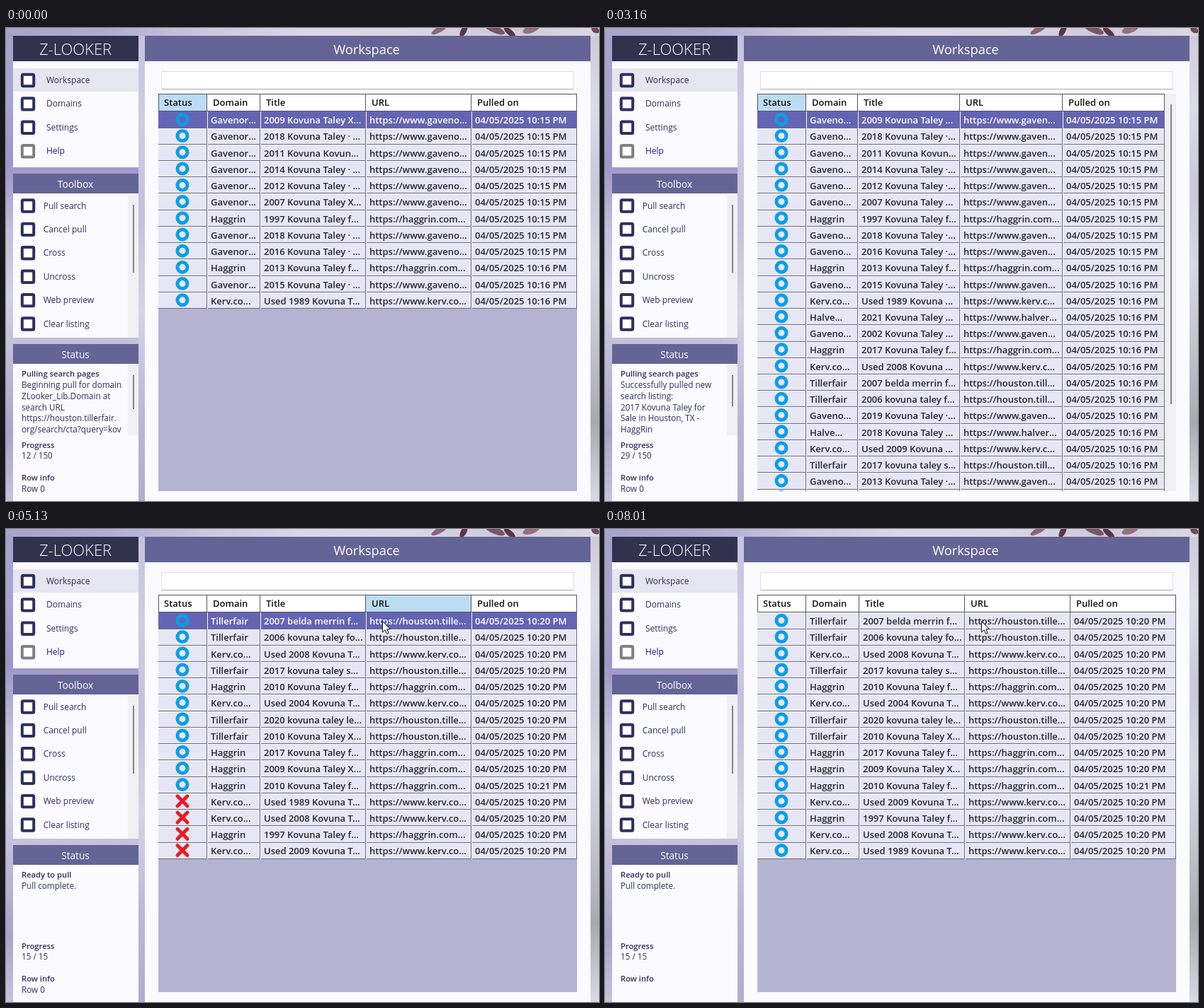
An HTML page with a canvas that plays this animation: 837 by 669 pixels, repeating every 8330 ms.

```html
<!DOCTYPE html>
<html lang="en">
<head>
<meta charset="utf-8">
<title>Listing workspace</title>
<style>
html, body { margin: 0; width: 100%; height: 100%; overflow: hidden; background: #b8b4d4; }
canvas { display: block; }
</style>
</head>
<body>
<canvas id="stage" width="837" height="669"></canvas>
<script>
const ctx = document.getElementById('stage').getContext('2d');
const W = 837, H = 669, LOOP = 8330;
const TOP = 118.3, PITCH = 23.23, BOTTOM = 655;
const NAVY = '#2e2e60', BAR = '#646496', PANEL = '#fafaff', BLUE = '#0a9ee8';
const CELL = '600 13px', BODY = '400 11.7px', BOLD = '600 11.2px';

const SITES = {
  F: { name: 'Gavenork', wide: 7, narrow: 6, url: 'https://www.gavenork.com/marketplace' },
  O: { name: 'Haggrin', wide: 9, narrow: 9, url: 'https://haggrin.com/item/detail' },
  C: { name: 'Kerv.com', wide: 7, narrow: 7, url: 'https://www.kerv.com/vehicledetail' },
  E: { name: 'Halvers', wide: 6, narrow: 5, url: 'https://www.halvers.com/inventory' },
  L: { name: 'Tillerfair', wide: 12, narrow: 12, url: 'https://houston.tillerfair.org/ctd/d' }
};
const CAR = 'Kovuna Taley';
// Kind letter -> [site, title after the year]
const KINDS = {
  F: ['F', CAR + ' · SE Sedan 4D - Gavenork'],
  f: ['F', CAR + ' XLE Sedan 4D - Gavenork'],
  T: ['F', 'Kovuna ' + CAR + ' - Gavenork'],
  O: ['O', CAR + ' for Sale in Houston, TX - HaggRin'],
  o: ['O', CAR + ' XLE for Sale in Houston, TX - HaggRin'],
  C: ['C', CAR + ' for sale near Houston, TX'],
  E: ['E', CAR + ' XLE for sale - Halvers'],
  H: ['L', 'belda merrin for sale by owner - Pearland, TX - tillerfair'],
  L: ['L', 'kovuna taley for sale by owner - Houston, TX - tillerfair'],
  S: ['L', 'kovuna taley sedan - Houston, TX - tillerfair'],
  l: ['L', 'kovuna taley le - Houston, TX - tillerfair'],
  M: ['L', CAR + ' XLE - Houston, TX - tillerfair']
};

function parse(list, stamp) {
  return list.split(' ').map((code, i) => {
    const [site, rest] = KINDS[code[0]], year = code.slice(1);
    return {
      site: SITES[site],
      title: (site === 'C' ? 'Used ' : '') + year + ' ' + rest,
      date: '04/05/2025 10:' + stamp(i) + ' PM'
    };
  });
}
const pulled = parse('f2009 F2018 T2011 F2014 F2012 f2007 O1997 F2018 F2016 O2013 F2015 C1989 ' +
  'E2021 f2002 O2017 C2008 H2007 L2006 F2019 E2018 C2009 S2017 F2013 O2009 ' +
  'O2010 C2004 l2020 M2010 O2017 O2010', i => i < 9 ? 15 : 16);
const sorted = parse('C2008 C2009 O1997 H2007 L2006 C2008 S2017 O2010 C2004 l2020 M2010 ' +
  'O2017 o2009 O2010 C1989', i => i === 13 ? 21 : 20);

// [time, rows in the grid, rows reported]
const PULLS = [
  [0, 12, 12], [240, 13, 12], [320, 14, 13], [400, 15, 14], [440, 16, 15], [520, 17, 16], [600, 17, 17],
  [1200, 18, 17], [1240, 18, 18], [1680, 20, 18], [1720, 21, 20], [1800, 22, 22], [1960, 23, 23],
  [2200, 24, 24], [2400, 25, 24], [2440, 25, 25], [2520, 26, 25], [2560, 26, 26], [2640, 27, 26],
  [2680, 27, 27], [2800, 28, 27], [2840, 28, 28], [3120, 29, 28], [3160, 29, 29], [3400, 30, 29], [3440, 30, 30]
];
// [time, first selected, last selected]
const PICKS = [
  [3700, 0, 0], [3930, 1, 1], [4890, 0, 0], [5610, 1, 1], [5690, 2, 2], [5850, 3, 3],
  [6010, 4, 4], [6090, 5, 5], [6170, 6, 6], [6370, 7, 7], [6530, 8, 8], [6610, 9, 9],
  [6770, 10, 10], [6890, 11, 11], [7170, 11, 12], [7290, 11, 13], [7450, 11, 14], [7850, -1, -1]
];
const CROSSES = [[3730, 0], [4490, 1], [5130, 0]]; // [time, row crossed out]
const UNCROSS = 7850;

const latest = (steps, t) => steps.filter(s => s[0] <= t).pop();

function rect(x, y, w, h, color) {
  ctx.fillStyle = color;
  ctx.fillRect(x, y, w, h);
}
function setFont(font) {
  ctx.font = font + ' "Open Sans", "Noto Sans", sans-serif';
}
function text(str, x, y, font, color, align = 'left') {
  setFont(font);
  ctx.fillStyle = color;
  ctx.textAlign = align;
  ctx.fillText(str, x, y);
}
function clip(str, width) {
  setFont(CELL);
  if (ctx.measureText(str).width <= width) return str;
  let n = str.length;
  while (n && ctx.measureText(str.slice(0, n) + '...').width > width) n--;
  return str.slice(0, n) + '...';
}
function wrap(str, width) {
  setFont(BODY);
  const lines = [''];
  for (const word of str.split(' ')) {
    const last = lines.length - 1, next = lines[last] ? lines[last] + ' ' + word : word;
    if (ctx.measureText(next).width <= width) lines[last] = next;
    else lines.push(word);
  }
  return lines;
}
function strip(x, y, w, h, colors, across) {
  const g = ctx.createLinearGradient(x, y, across ? x + w : x, across ? y : y + h);
  colors.forEach((c, i) => g.addColorStop(i / (colors.length - 1), c));
  rect(x, y, w, h, g);
}
function blob(x, y, rx, ry, turn, color) {
  ctx.fillStyle = color;
  ctx.beginPath();
  ctx.ellipse(x, y, rx, ry, turn, 0, 7);
  ctx.fill();
}

function drawBackdrop() {
  strip(0, 0, 196, H, ['#a6a1cb', '#aaa4d0', '#9d96c8', '#c2bedb', '#d2d0e4', '#bdb8d6', '#aaa3cb', '#c6c2dc']);
  strip(187, 0, 9, H, ['#c6c2de', '#d0cce4', '#c4c0dc', '#d6d4e6', '#bcb8d6', '#b2acd0']);
  strip(825, 0, 12, H, ['#cfc9da', '#dcdce8', '#c9c8dc', '#d8d8e4', '#c4c4d0', '#a9a9b4', '#dadae4']);
  strip(0, 0, W, 11, ['#a8a3cc', '#b0abd2', '#cac7e0', '#d8d6e8', '#d9d7e7', '#cfc9da', '#dcd8e4'], true);
  blob(612, 2, 13, 4, -0.5, '#8c6478');
  blob(646, 4, 4, 9, 0.5, '#5c3448');
  blob(690, 2, 15, 5, 0.4, '#7a5468');
  blob(711, 6, 10, 4, 0.7, '#5c3448');
  blob(741, 2, 12, 5, -0.3, '#94707f');
  blob(832, 3, 6, 4, 0.5, '#74485a');
}

function checkbox(x, y, color) {
  ctx.strokeStyle = color;
  ctx.lineWidth = 4;
  ctx.fillStyle = '#fff';
  ctx.beginPath();
  ctx.roundRect(x - 8.2, y - 8.2, 16.4, 16.4, 1.5);
  ctx.fill();
  ctx.stroke();
}
function thumb(x, y, h) {
  rect(x, y, 2, h, '#868689');
}

function drawSidebar() {
  rect(10, 11, 177, 186, PANEL);
  rect(10, 11, 177, 36, '#32324e');
  text('Z-LOOKER', 98, 38, '300 22px', '#fff', 'center');
  rect(10, 57, 177, 33, '#e6e6f0');
  ['Workspace', 'Domains', 'Settings', 'Help'].forEach((label, i) => {
    const y = 74 + i * 33.4;
    checkbox(31, y, i === 3 ? '#808080' : NAVY);
    text(label, 57, y + 4, '400 12px', i === 3 ? '#1c1c80' : NAVY);
  });

  rect(10, 206, 177, 232, PANEL);
  rect(10, 206, 177, 28, BAR);
  text('Toolbox', 98, 226, '400 13.8px', '#fff', 'center');
  rect(172, 235, 15, 203, '#f0f0f2');
  thumb(179, 250, 96);
  ['Pull search', 'Cancel pull', 'Cross', 'Uncross', 'Web preview', 'Clear listing'].forEach((label, i) => {
    const y = 251.5 + i * 33.4;
    checkbox(31, y, NAVY);
    text(label, 52.7, y + 4, '400 12px', NAVY);
  });

  rect(10, 447, 177, 222, PANEL);
  rect(10, 447, 177, 28, BAR);
  text('Status', 98, 467, '400 13.6px', '#fff', 'center');
}

function drawStatus(s) {
  text(s.heading, 22, 493, BOLD, NAVY);
  s.lines.slice(0, 5).forEach((line, i) => text(line, 22, 509 + i * 15.8, BODY, NAVY));
  if (s.scroll) {
    rect(172, 476, 15, 100, '#f0f0f2');
    thumb(179, 491, s.scroll);
  }
  text('Progress', 22, 594, BOLD, NAVY);
  text(s.progress, 22, 609, BODY, NAVY);
  text('Row info', 22, 640, BOLD, NAVY);
  text(s.rowInfo, 22, 656, BODY, NAVY);
}

function drawMark(y, crossed) {
  ctx.lineWidth = 5;
  ctx.beginPath();
  if (crossed) {
    ctx.strokeStyle = '#e91c24';
    ctx.lineCap = 'round';
    for (const d of [-7, 7]) {
      ctx.moveTo(249 - d, y - 7);
      ctx.lineTo(249 + d, y + 7);
    }
  } else {
    ctx.strokeStyle = BLUE;
    ctx.arc(249, y, 7, 0, 7);
  }
  ctx.stroke();
  ctx.lineCap = 'butt';
}

function drawRow(row, i, cols, narrow, selected) {
  const y = Math.round(TOP + i * PITCH), end = Math.round(TOP + (i + 1) * PITCH);
  const base = TOP + i * PITCH + 16.9, color = selected ? '#fff' : '#26262e';
  rect(215, y, cols[5] - 215, end - y, selected ? '#6464b4' : '#e6e6f5');
  if (!selected) rect(215, y, cols[5] - 215, 1, '#f6f6fc');
  rect(215, end - 1, cols[5] - 215, 1, '#6c6c78');
  for (let c = 1; c < 6; c++) {
    rect(cols[c] - 1, y, 1, end - y, '#6c6c78');
    if (c < 5) rect(cols[c], y, 1, end - y, '#f6f6fc');
  }
  drawMark(TOP + i * PITCH + 11, row.crossed);
  const name = row.site.name, keep = narrow ? row.site.narrow : row.site.wide;
  const cells = [
    name.length > keep ? name.slice(0, keep) + '...' : name,
    clip(row.title, cols[3] - cols[2] - 9),
    clip(row.site.url, cols[4] - cols[3] - 9),
    row.date
  ];
  cells.forEach((cell, c) => text(cell, cols[c + 1] + 5, base, CELL, color));
}

function drawGrid(rows, first, last, hot) {
  const narrow = rows.length > 23;
  const cols = narrow ? [215, 284, 357, 501, 646, 790] : [215, 284, 359, 508, 657, 806];
  rect(215, 93, 591, BOTTOM - 93, '#b4b4d2');
  ctx.save();
  ctx.beginPath();
  ctx.rect(215, 93, 591, BOTTOM - 93);
  ctx.clip();
  rows.slice(0, 24).forEach((row, i) => drawRow(row, i, cols, narrow, i >= first && i <= last));
  ctx.restore();
  ['Status', 'Domain', 'Title', 'URL', 'Pulled on'].forEach((label, c) => {
    rect(cols[c], 93, cols[c + 1] - cols[c], 25, c === hot ? '#bcdcf4' : '#fff');
    rect(cols[c + 1] - 1, 93, 1, 25, '#55555e');
    text(label, cols[c] + 8, 110, CELL, '#111');
  });
  rect(215, 93, cols[5] - 215, 1, '#55555e');
  rect(215, 117, cols[5] - 215, 1, '#55555e');
  rect(215, 93, 1, 25, '#55555e');
  if (narrow) {
    rect(790, 93, 16, BOTTOM - 93, '#f0f0f2');
    thumb(798, 108, 532 * 537 / (rows.length * PITCH));
  }
}

function drawCursor(x, y) {
  ctx.beginPath();
  [[0, 0], [0, 15.5], [3.6, 12.2], [6.2, 17.8], [8.6, 16.7], [6.1, 11.3], [11, 11]]
    .forEach(([dx, dy]) => ctx.lineTo(x + dx, y + dy));
  ctx.closePath();
  ctx.fillStyle = '#fff';
  ctx.fill();
  ctx.strokeStyle = '#111';
  ctx.lineWidth = 1;
  ctx.stroke();
}

function drawTip() {
  rect(585, 202, 252, 19, 'rgba(60,60,80,.3)');
  rect(583, 199, 254, 19, '#8a8a90');
  rect(584, 200, 253, 17, '#fff');
  text('https://houston.tillerfair.org/ctd/d/houston-2017-kovuna', 588, 212.5, '400 10.8px', '#55555a');
}

function pullState(t) {
  const [, count, done] = latest(PULLS, t);
  const intro = ['Beginning pull for domain', 'ZLooker_Lib.Domain at', 'search URL',
    'https://houston.tillerfair.', 'org/search/cta?query=kov'];
  const news = ['Successfully pulled new', 'search listing:', ...wrap(pulled[done - 1].title, 142)];
  return {
    rows: pulled.slice(0, count), first: 0, last: 0, hot: 0,
    status: {
      heading: 'Pulling search pages',
      lines: done === 12 ? intro : news,
      scroll: done === 12 || done === 24 ? 48 : 44,
      progress: done + ' / 150',
      rowInfo: 'Row 0'
    }
  };
}

function sortState(t) {
  const open = sorted.slice(0, 14), crossed = [sorted[14]];
  for (const [at, i] of CROSSES) if (t >= at) crossed.push(...open.splice(i, 1));
  const undone = t >= UNCROSS;
  const tail = undone ? crossed.reverse() : crossed.map(r => ({ ...r, crossed: true }));
  const [, first, last] = latest(PICKS, t);
  return {
    rows: [...open, ...tail], first, last, hot: undone ? -1 : 3,
    status: {
      heading: 'Ready to pull',
      lines: ['Pull complete.'],
      progress: '15 / 15',
      rowInfo: undone ? '' : first === last ? 'Row ' + first : `Rows ${first}-${last}`
    }
  };
}

function draw(t) {
  const sorting = t >= 3700, state = sorting ? sortState(t) : pullState(t);
  drawBackdrop();
  drawSidebar();
  drawStatus(state.status);

  rect(196, 11, 629, 658, PANEL);
  rect(196, 11, 629, 36, BAR);
  text('Workspace', 509, 37, '400 18.3px', '#fff', 'center');
  rect(219, 61, 583, 26, '#dedee4');
  rect(220, 62, 581, 24, '#fff');
  rect(220, 86, 581, 1, '#a8a8b0');
  drawGrid(state.rows, state.first, state.last, state.hot);
  if (sorting) drawCursor(531.5, 130.5);
  if (t >= 6450 && t < 8010) drawTip();
}

function tick(now) {
  draw(now % LOOP);
  requestAnimationFrame(tick);
}
tick(performance.now());
</script>
</body>
</html>
```
